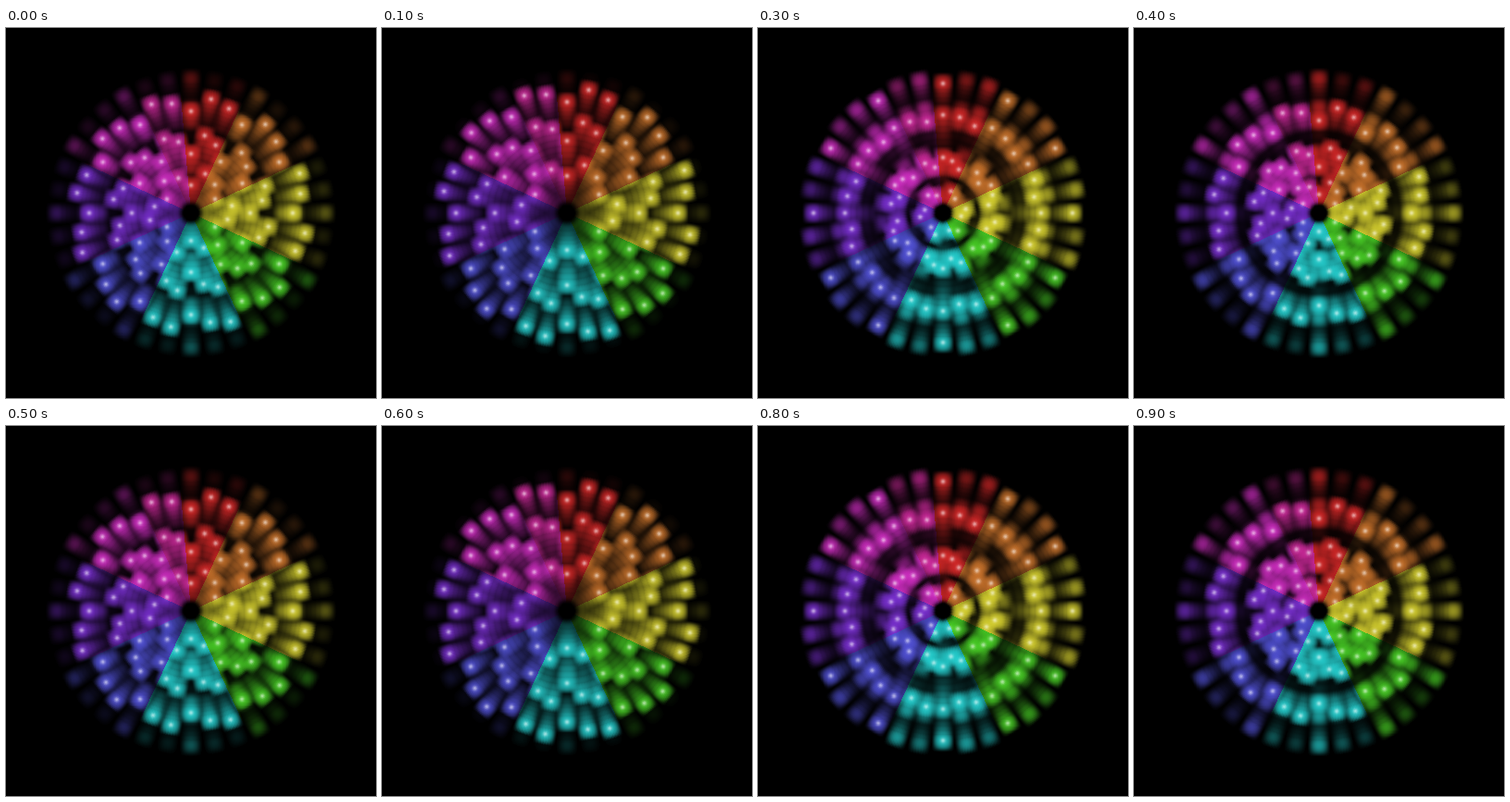
Write an HTML page with a canvas that moves like this. It is 400 by 400 pixels and loops after 1 s.

```html
<!DOCTYPE html>
<html lang="en">
<head>
<meta charset="utf-8">
<title>Rainbow burst</title>
<style>
  html, body { margin: 0; width: 100%; height: 100%; overflow: hidden; background: #000; }
  canvas { display: block; width: 400px; height: 400px; }
</style>
</head>
<body>
<canvas id="stage" width="400" height="400"></canvas>
<script>
const SIZE = 400, MID = 200, STEPS = 5, STEP_MS = 100, SUB = 2;
const REACH = 13, CORE = 2.6, EXPOSURE = 1.9;

// Each ring sends dots outward along evenly spaced spokes.
const RINGS = [
  { from: 100, span: 50, spokes: 36 },
  { from: 50, span: 70, spokes: 36 },
  { from: 20, span: 50, spokes: 18 }
];
const PHASES = [0.2, 0.5, 0.4];

// Wedges, clockwise from the top: end angle and colour.
const WEDGES = [
  [25, [218, 40, 40]],
  [65, [208, 118, 44]],
  [115, [220, 214, 48]],
  [155, [74, 214, 38]],
  [205, [38, 216, 216]],
  [245, [84, 84, 222]],
  [295, [124, 48, 214]],
  [335, [214, 46, 200]],
  [355, [212, 42, 160]],
  [361, [218, 40, 40]]
];

const ctx = document.getElementById('stage').getContext('2d');
const wrap = p => ((p % 1) + 1.00001) % 1;
const spark = d => Math.exp(-(d * d) / (CORE * CORE));
const glow = d => Math.max(0, 1 - (d * d) / (REACH * REACH)) ** 2;

// Brightness along a spoke: fading trail plus bright head.
function profile(ring, phase) {
  const at = p => ring.from + ring.span * wrap(p);
  const head = at(phase);
  const trail = [];
  for (let i = 1; i < SUB * STEPS; i++) {
    const age = i / SUB;
    trail.push([at(phase - age / STEPS), 0.9 * Math.pow(0.42, age)]);
  }
  return u => {
    let level = glow(u - head);
    for (const [r, gain] of trail) level = Math.max(level, gain * glow(u - r));
    return [level, spark(u - head)];
  };
}

// Samples a profile twice per pixel.
function sample(ring, phase) {
  const f = profile(ring, phase);
  const start = ring.from - REACH, count = 2 * (ring.span + 2 * REACH);
  return Array.from({ length: count + 1 }, (_, i) => f(start + i / 2));
}

function paintSpoke(light, core, ring, line, angle) {
  const sx = Math.sin(angle), sy = -Math.cos(angle);
  const lo = ring.from - REACH, hi = ring.from + ring.span + REACH;
  const range = s => [
    Math.floor(MID + Math.min(s * lo, s * hi) - REACH),
    Math.ceil(MID + Math.max(s * lo, s * hi) + REACH)
  ];
  const [x0, x1] = range(sx), [y0, y1] = range(sy);
  for (let y = y0; y <= y1; y++) {
    for (let x = x0; x <= x1; x++) {
      const dx = x + 0.5 - MID, dy = y + 0.5 - MID;
      const v = dx * sy - dy * sx;
      const hit = line[Math.round((dx * sx + dy * sy - lo) * 2)];
      if (!hit || Math.abs(v) > REACH) continue;
      const i = y * SIZE + x;
      light[i] += hit[0] * glow(v);
      core[i] += hit[1] * spark(v);
    }
  }
}

function wedgeColor(x, y) {
  const turn = Math.atan2(x + 0.5 - MID, MID - y - 0.5) * 180 / Math.PI;
  const angle = (turn + 360) % 360;
  return WEDGES.find(([end]) => angle < end)[1];
}

function render(step) {
  const light = new Float32Array(SIZE * SIZE);
  const core = new Float32Array(SIZE * SIZE);
  for (const ring of RINGS) {
    const lines = PHASES.map(p => sample(ring, p + step / STEPS));
    for (let k = 0; k < ring.spokes; k++) {
      paintSpoke(light, core, ring, lines[k % 3], k * 2 * Math.PI / ring.spokes);
    }
  }
  const image = ctx.createImageData(SIZE, SIZE);
  for (let i = 0; i < light.length; i++) {
    const level = 1 - Math.exp(-EXPOSURE * light[i]);
    const white = 0.55 * Math.min(1, core[i]);
    if (level > 0.012) {
      const color = wedgeColor(i % SIZE, Math.floor(i / SIZE));
      for (let c = 0; c < 3; c++) {
        const base = color[c] * level;
        image.data[i * 4 + c] = base + (255 - base) * white;
      }
    }
    image.data[i * 4 + 3] = 255;
  }
  return image;
}

const images = Array.from({ length: STEPS }, (_, step) => render(step));
const start = performance.now();
let shown = -1;

function draw(now) {
  const step = Math.floor(Math.max(0, now - start) / STEP_MS) % STEPS;
  if (step !== shown) ctx.putImageData(images[step], 0, 0);
  shown = step;
  requestAnimationFrame(draw);
}
draw(start);
</script>
</body>
</html>
```
